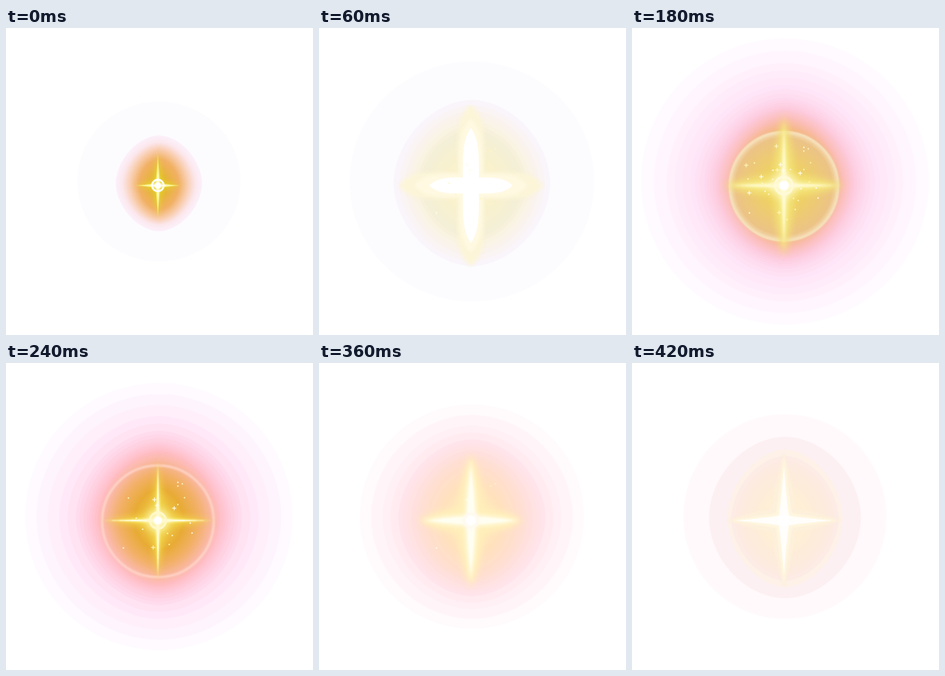
These frames come from a looping animation (384x384 px, 0.48 s). An HTML page with a canvas:

```html
<!DOCTYPE html>
<html lang="en">
<head>
<meta charset="utf-8">
<title>Star burst</title>
<style>
  html, body { margin: 0; width: 100%; height: 100%; overflow: hidden; background: #fff; }
  canvas { display: block; width: 384px; height: 384px; }
</style>
</head>
<body>
<canvas id="stage" width="384" height="384"></canvas>
<script>
const ctx = document.getElementById('stage').getContext('2d');
const CX = 190, CY = 197, STEP = 60;

// halo: [rx, ry, colour, bands up to the next stop]
// orb:  [radius, inner, outer, rim, rim width]
// rays: [half width, half height, thickness, taper, blur, colour]
// core: [glow radius, ring radius, dot radius, ring colour]
const poses = [
  { halo: [[102, 100, '#fcfcff', 1], [54, 60, '#fceff8', 3], [46, 52, '#fbe6ea', 8],
           [36, 44, '#f9ceb0', 12], [25, 32, '#f1b062', 10], [8, 10, '#e2b52c', 1]],
    rays: [[29, 40, 8, .55, 3, '#e5d52f'], [28, 40, 4, .6, .6, '#f5ec72'], [20, 27, 2, .6, .4, '#fffbd0']],
    core: [5, 7.3, 3.6, '#fff'] },
  { halo: [[153, 150, '#fcfcff', 1], [98, 104, '#faf5fa', 2], [84, 91, '#faf3ed', 2],
           [73, 78, '#f9f3e1', 2], [64, 68, '#f4efd7', 4], [36, 38, '#f9f2cc', 1]],
    rays: [[90, 101, 17, 7, 2, '#fcf5d8'], [71, 84, 14, 6, 2, '#fff9e2'],
           [52, 72, 10, 5, .5, '#fff']],
    core: [13, 0, 10, '#fff'], sparks: 9 },
  { halo: [[192, 192, '#fffbff', 1], [160, 160, '#fff1fd', 1], [132, 134, '#fdeafb', 1],
           [108, 116, '#fce3f7', 4], [91, 100, '#fbd7ec', 4], [76, 86, '#fbcbd6', 6], [62, 70, '#f7c5a9', 1]],
    orb: [66, '#f2e58c', '#e5d574', '#f2edbf', 4],
    rays: [[82, 105, 17, 4, 6, '#f7f0b4'], [72, 90, 10, 4, 4, '#fcf8d5'], [62, 78, 4, 3, 2, '#fffce9']],
    core: [23, 11, 8, '#fffbe2'], sparks: 52 },
  { halo: [[180, 179, '#fffaff', 2], [148, 149, '#fff0fc', 3], [119, 123, '#ffe5f8', 3],
           [101, 107, '#fed9ed', 4], [87, 95, '#fdcadc', 6], [73, 82, '#fbbdb5', 8], [62, 68, '#f3b77e', 1]],
    orb: [69, '#efd657', '#ecc386', '#f6dfba', 3],
    rays: [[75, 88, 12, 2, 5, '#f4e477'], [72, 81, 6, 1, 2, '#fbf1a0'], [64, 72, 3, .8, .8, '#fffbd4']],
    core: [19, 11, 6, '#fffad8'], sparks: 34 },
  { halo: [[167, 167, '#fefaff', 3], [125, 127, '#ffe9f9', 2], [104, 109, '#ffdced', 3],
           [90, 96, '#ffcddd', 4], [77, 85, '#ffbdc3', 6], [67, 74, '#fab8a2', 10],
           [51, 58, '#f2b066', 10], [32, 40, '#e8ab35', 8], [14, 16, '#efcb45', 1]],
    orb: [71, '', '', '#ffd8cc', 2.5],
    rays: [[70, 74, 11, .65, 4, '#f3d849'], [70, 74, 5, .6, 1, '#faed82'], [62, 69, 2.4, .7, .5, '#fffbd6']],
    core: [17, 10, 5, '#fff9cb'], sparks: 20 },
  { halo: [[154, 154, '#fffafc', 2], [127, 128, '#ffeff8', 3], [102, 105, '#ffdfeb', 3],
           [86, 91, '#ffd1dc', 4], [73, 82, '#ffcbcb', 6], [60, 69, '#ffcdb5', 8],
           [42, 52, '#fdc995', 8], [22, 30, '#ffd883', 1]],
    orb: [71, '', '', '#ffdfd9', 2],
    rays: [[63, 84, 14, 4, 5, '#ffe78c'], [58, 79, 8, 4, 2.5, '#fff5b7'], [51, 69, 4.5, 3, 1.4, '#fffde6']],
    core: [12, 10, 6, '#fff6dc'], sparks: 12 },
  { halo: [[140, 140, '#fffafc', 2], [112, 115, '#fff0f5', 2], [92, 98, '#ffe5eb', 3],
           [76, 85, '#ffe0de', 4], [62, 74, '#ffdfd0', 5], [40, 50, '#ffe1be', 5], [22, 28, '#ffebba', 1]],
    rays: [[65, 83, 14, 3, 4, '#fff0ba'], [61, 76, 8, 2, 2, '#fff8d8'], [53, 66, 5, 1.5, 1, '#fffef2']],
    core: [12, 9, 6, '#fffaf0'], sparks: 5 },
  { halo: [[127, 128, '#fff9fb', 1], [95, 101, '#fdf0f2', 1], [72, 86, '#fdf1e8', 1],
           [67, 78, '#fdebe5', 3], [51, 61, '#fdebdc', 3], [30, 36, '#feefd6', 1]],
    rays: [[71, 84, 15, 1.7, 1.5, '#fdf0db'], [66, 82, 11, 1, 1, '#fff6df'],
           [60, 68, 8, .65, .5, '#fffefb']],
    core: [9, 0, 7, '#fff'] }
];

const mix = (a, b, t) => a + (b - a) * t;
const rgb = hex => [1, 3, 5].map(i => parseInt(hex.slice(i, i + 2), 16));

function fill(color, blur = 0) {
  ctx.filter = blur ? `blur(${blur}px)` : 'none';
  ctx.fillStyle = color;
  ctx.fill();
  ctx.filter = 'none';
}

function disc(x, y, r, color, blur) {
  ctx.beginPath();
  ctx.arc(x, y, r, 0, Math.PI * 2);
  fill(color, blur);
}

function ring(x, y, r, color, width, blur) {
  ctx.beginPath();
  ctx.arc(x, y, r, 0, Math.PI * 2);
  ctx.filter = `blur(${blur}px)`;
  ctx.strokeStyle = color;
  ctx.lineWidth = width;
  ctx.stroke();
  ctx.filter = 'none';
}

// Nearly round outside, softly diamond-shaped towards the middle.
function haloBand(rx, ry, color, outer) {
  const power = 2 / (2 - 0.22 * Math.min(1, 2 * (1 - rx / outer)));
  const cy = CY - 5 * rx / outer;
  const bend = v => Math.sign(v) * Math.abs(v) ** power;
  ctx.beginPath();
  for (let i = 0; i < 120; i++) {
    const a = i * Math.PI / 60;
    ctx.lineTo(CX + 1.3 + rx * bend(Math.cos(a)), cy + ry * bend(Math.sin(a)));
  }
  fill(color);
}

function drawHalo(stops) {
  stops.forEach(([rx, ry, color, bands], i) => {
    const [rx2, ry2, color2] = stops[i + 1] || stops[i];
    const from = rgb(color), to = rgb(color2);
    for (let k = 0; k < bands; k++) {
      const t = k / bands;
      const c = from.map((v, j) => Math.round(mix(v, to[j], t)));
      haloBand(mix(rx, rx2, t), mix(ry, ry2, t), `rgb(${c})`, stops[0][0]);
    }
  });
}

function drawOrb([r, inner, outer, rim, width]) {
  if (inner) {
    const g = ctx.createRadialGradient(CX, CY + 1, 12, CX, CY + 1, r);
    g.addColorStop(0, inner);
    g.addColorStop(.85, outer);
    g.addColorStop(1, rim);
    disc(CX, CY + 1, r, g);
  }
  ring(CX, CY + 1, r - width / 2, rim, width, .8);
}

function drawRays([w, h, thick, taper, blur, color]) {
  ctx.beginPath();
  for (const [len, vertical] of [[w, false], [h, true]]) {
    for (let i = 0; i <= 160; i++) {
      const a = i * Math.PI / 80;
      const t = Math.cos(a);
      const side = Math.sign(Math.sin(a)) * thick * (1 - Math.abs(t) ** taper);
      const x = vertical ? side : len * t;
      const y = vertical ? len * t : -side;
      ctx[i ? 'lineTo' : 'moveTo'](CX + x, CY + y);
    }
    ctx.closePath();
  }
  fill(color, blur);
}

function drawSparks(count) {
  let seed = 41;
  const random = () => (seed = seed * 16807 % 2147483647) / 2147483647;
  random();
  for (let i = 0; i < count; i++) {
    const a = random() * Math.PI * 2, r = 14 + 42 * random();
    const x = CX + r * Math.cos(a), y = CY + r * Math.sin(a);
    const size = random() < .2 ? 2.6 : .9;
    ctx.fillStyle = i % 3 ? '#fff7bd' : '#fffdf0';
    ctx.fillRect(x - size, y - .5, size * 2, 1);
    ctx.fillRect(x - .5, y - size, 1, size * 2);
  }
}

function drawCore([glow, ringRadius, dot, color]) {
  disc(CX, CY, glow * .75, color, glow * .3);
  if (ringRadius) ring(CX, CY, ringRadius, color, 2.4, .5);
  disc(CX, CY, dot, '#fff', .7);
}

function draw({ halo, orb, rays, core, sparks = 0 }) {
  ctx.fillStyle = '#fff';
  ctx.fillRect(0, 0, 384, 384);
  drawHalo(halo);
  if (orb) drawOrb(orb);
  rays.forEach(drawRays);
  drawSparks(sparks);
  drawCore(core);
}

let shown = -1;
const start = performance.now();
function tick(now) {
  const index = Math.floor(Math.max(0, now - start) / STEP) % poses.length;
  if (index !== shown) draw(poses[shown = index]);
  requestAnimationFrame(tick);
}
tick(start);
</script>
</body>
</html>
```
